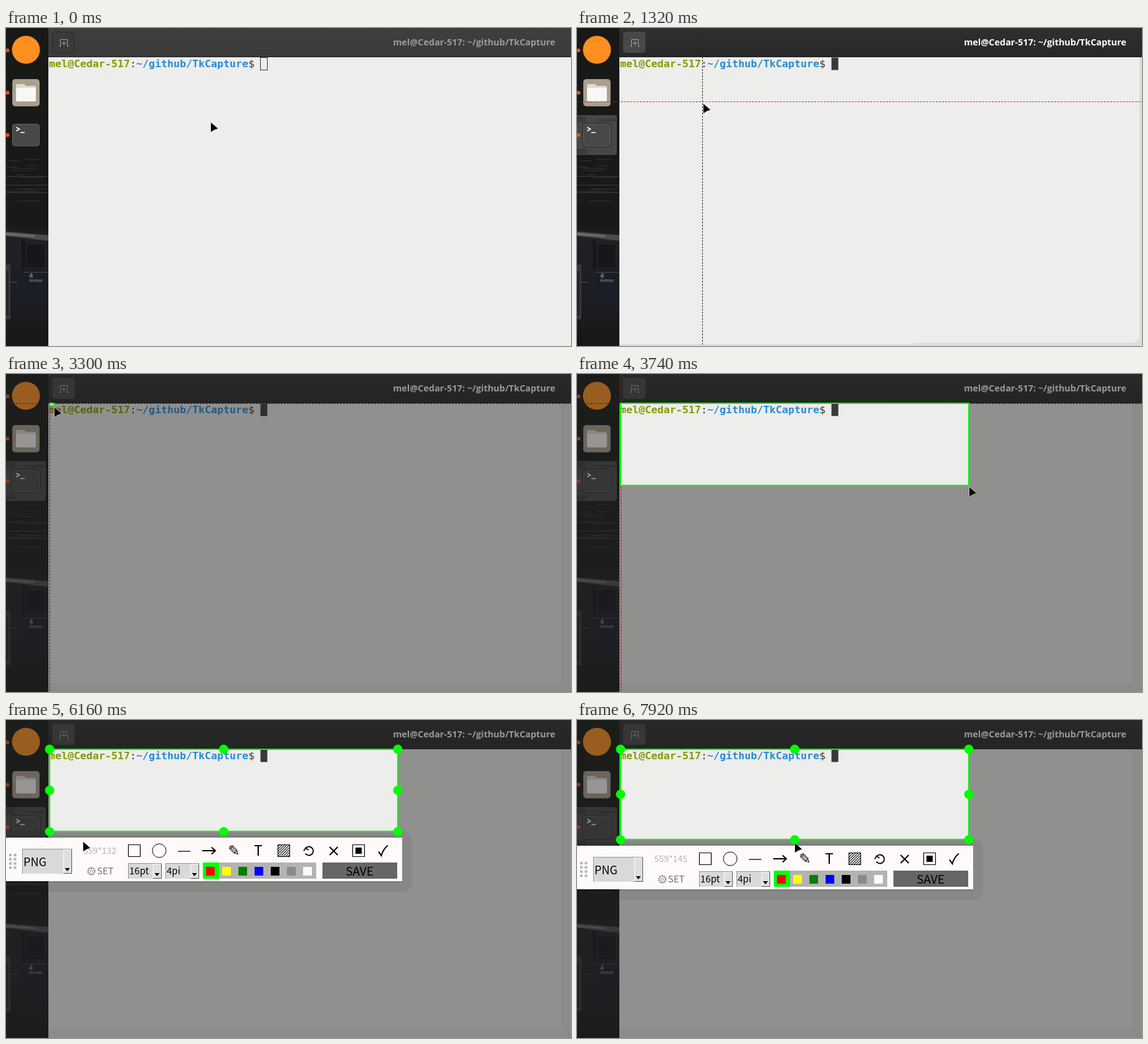
An HTML page for the animation above (8000 ms loop, 907 by 511 pixels).

```html
<!DOCTYPE html>
<html lang="en">
<head>
<meta charset="utf-8">
<title>Screen capture demo</title>
<style>
  html, body { margin: 0; width: 100%; height: 100%; overflow: hidden; background: #191a19; }
  svg { display: block; width: 907px; height: 511px; }
  text { white-space: pre; }
  .mono { font: 16.61px "DejaVu Sans Mono", monospace; fill: #333; }
  .mono .b { font-weight: 700; }
  .title { font: 700 14.4px "Open Sans", "Noto Sans", sans-serif; text-anchor: middle; fill: #9b9b99; }
  .ui { font-family: "Noto Sans CJK SC", "Noto Sans CJK JP", "Noto Sans CJK", "Noto Sans", sans-serif; }
  .line { fill: none; stroke: #000; }
  .active .title { fill: #fff; }
  .active .tab { fill: #484848; stroke: #484848; }
  .active .plus { stroke: #f2f2f2; }
  .active .bar { fill: url(#barOn); }
  .active .block { fill: #393939; stroke: none; }
  .on { display: none; }
  .active .on { display: inline; }
  .hot .combo:first-of-type .field { fill: #ececec; }
  [hidden] { display: none; }
</style>
</head>
<body>
<svg id="stage" viewBox="0 0 907 511" xmlns="http://www.w3.org/2000/svg">
  <defs>
    <linearGradient id="barOff" x2="0" y2="1"><stop stop-color="#3f3f3e"/><stop offset="1" stop-color="#3a3a3a"/></linearGradient>
    <linearGradient id="barOn" x2="0" y2="1"><stop stop-color="#303030"/><stop offset="1" stop-color="#272727"/></linearGradient>
    <linearGradient id="wall" x2="0" y2="1">
      <stop stop-color="#171917"/><stop offset=".62" stop-color="#181918"/>
      <stop offset=".66" stop-color="#202124"/><stop offset=".85" stop-color="#1c1e23"/><stop offset="1" stop-color="#161616"/>
    </linearGradient>
    <pattern id="hatch" width="4" height="4" patternUnits="userSpaceOnUse">
      <path d="M-1 1L1-1M-1 5L5-1M3 5L5 3" stroke="#000" stroke-width="1.1"/>
    </pattern>
  </defs>

  <!-- dock -->
  <rect width="68" height="511" fill="url(#wall)"/>
  <g id="streaks"></g>
  <path d="M0 327L68 333V342L0 334Z" fill="#4b4c50"/>
  <path d="M0 329L46 333V336L0 333Z" fill="#6a6b6d"/>
  <path d="M25 340H31V388H25ZM34 348H62V384H34Z" fill="#15171b"/>
  <path d="M32 388H66V440H32Z" fill="#1a1e26"/>
  <path d="M0 380H7V468H0Z" fill="#37383a"/>
  <path d="M0 390H4V462H0Z" fill="#232426"/>
  <path d="M29 392.500H68M6 408.500H19" stroke="#4a4b4d"/>
  <g class="ui" fill="#77787a" font-weight="700">
    <text x="37" y="402" font-size="11">4</text><text x="37" y="408" font-size="6">Avenue</text>
  </g>
  <path class="on" d="M0 140H60Q64 140 64 144V200Q64 204 60 204H0Z" fill="#474747"/>
  <path class="on" d="M0 142H14V152H0ZM30 146H62V150H36ZM0 194H16V202H0Z" fill="#3b3b3b"/>
  <circle cx="32" cy="35" r="22.500" fill="#ff8f1f"/>
  <rect x="10" y="82" width="44" height="44" rx="5" fill="#9c9481"/>
  <rect x="11" y="83" width="42" height="41" rx="4" fill="#a9a18e"/>
  <path d="M16 92Q16 90 18 90H29L32 93H46Q48 93 48 95V112H16Z" fill="#dedad2"/>
  <rect x="16" y="96" width="32" height="22" rx="2.500" fill="#f8f7f4"/>
  <rect class="on" x="8.500" y="152.500" width="47" height="39" rx="5" fill="#303030"/>
  <rect x="10.500" y="154.500" width="43" height="35" rx="4" fill="#484848" stroke="#626262"/>
  <path d="M16.500 159.500L21.500 162.500L16.500 165.500M23 168H30" class="line" style="stroke:#fff;stroke-width:1.7"/>
  <g fill="#e35220"><circle cx="2.500" cy="36" r="3"/><circle cx="2.500" cy="104" r="3"/><circle cx="2.500" cy="172" r="3"/></g>

  <!-- terminal -->
  <rect x="68" width="839" height="47" class="bar" fill="url(#barOff)"/>
  <rect x="68" y="46" width="839" height="1" fill="#222"/>
  <rect class="tab" x="74.500" y="6.500" width="35" height="33" rx="4" fill="#3a3a3a" stroke="#282828"/>
  <path class="plus line" d="M85 29.500H87.500V18.500H98.500V29.500H101M89.500 24.500H96.500M93 21V28" style="stroke:#a5a5a5"/>
  <text class="title" x="751.500" y="28">mel@Cedar-517: ~/github/TkCapture</text>
  <rect x="68" y="47" width="839" height="464" fill="#ededeb"/>
  <path id="edgeSoft" d="M903 47H907V511H68V508H535L545 506H890Q903 506 903 492Z" fill="#dcdcda"/>
  <path id="edgeDim" d="M891 47H907V511H68V497H891Z" fill="#e4e4e2"/>
  <text class="mono" x="69" y="63"><tspan class="b" fill="#859900">mel@Cedar-517</tspan>:<tspan class="b" fill="#268bd2">~/github/TkCapture</tspan>$</text>
  <rect class="block" x="408.500" y="47.500" width="11" height="20" fill="none" stroke="#333"/>

  <g id="cross" fill="none" stroke-dasharray="3 2"><path id="vLine"/><path id="hLine"/></g>
  <path id="dim" fill="#212121" fill-opacity=".46" fill-rule="evenodd"/>
  <g id="panel"></g>
  <rect id="sel" x="70" y="47" fill="none" stroke="#0f0" stroke-width="2"/>
  <g id="knobs" fill="#0f0"></g>
  <path id="mouse" d="M0 0V15L4.500 12L11 9.500Z" fill="#000" stroke="#d8d8d8" stroke-width="1.200" paint-order="stroke"/>
</svg>
<script>
const $ = id => document.getElementById(id);
const box = (x, y, w, h, fill, more = '') =>
  `<rect x="${x}" y="${y}" width="${w}" height="${h}" fill="${fill}" ${more}/>`;
const label = (x, y, size, fill, text, more = '') =>
  `<text class="ui" x="${x}" y="${y}" font-size="${size}" fill="${fill}" ${more}>${text}</text>`;
const stroke = (d, w = 1.2) => `<path class="line" d="${d}" stroke-width="${w}"/>`;

function combo(x, y, w, h, text, size, base) {
  const bx = x + w - 14, cx = bx + 6.5, by = y + h;
  return `<g class="combo">${box(x, y, w, h, '#d9d9d9', 'class="field"')}
    <path class="line" style="stroke:#929292" d="M${x + .5} ${by}V${y + .5}H${x + w}"/>
    ${box(bx, y + 1, 13, h - 2, '#dedede')}
    <path class="line" style="stroke:#fff" d="M${bx + .5} ${by - 1}V${y + 1.5}H${bx + 12}"/>
    <path class="line" style="stroke:#555" d="M${bx} ${by - .5}H${bx + 13.5}V${y + 1}"/>
    <path d="M${cx - 4} ${by - 9}h8l-4 5z"/>
    ${label(x + 2, base, size, '#000', text)}</g>`;
}

function toolbar() {
  const swatches = ['red', 'yellow', 'green', 'blue', 'black', '#8a8a8a', '#fffafa'];
  let s = box(-20, 177, 672, 100, '#000', 'rx="17" opacity=".055"') +
    box(-20, 185, 657, 77, '#000', 'rx="6" opacity=".06"') +
    box(0, 189, 636, 70, '#fffafa') +
    combo(26, 207, 80, 40, 'PNG', 18, 235);
  for (let i = 0; i < 8; i++) s += box(5 + i % 2 * 7.5, 215 + (i >> 1) * 6.8, 4, 4, '#b3b3b3');
  s += '<text id="size" class="ui" x="124" y="215" font-size="14" fill="#b4b4b4"></text>';
  s += `<g fill="none" stroke="#8b8b8b"><circle cx="137" cy="243" r="5.800" stroke-width="2" stroke-dasharray="2.2 1.4"/>
    <circle cx="137" cy="243" r="4.700"/><circle cx="137" cy="243" r="1.800"/></g>`;
  s += label(146, 248, 15, '#707070', 'SET');
  s += combo(196, 230, 54, 25, '16pt', 15, 248) + combo(256, 230, 54, 25, '4pi', 15, 248);
  s += box(316, 229, 182, 26, '#b3b3b3') + box(316, 229, 26, 26, '#0f0');
  swatches.forEach((c, i) => { s += box(321 + 26 * i, 236, 14, 14, c); });
  s += box(508, 229, 120, 26, '#666664') + label(567.5, 250, 19, '#000', 'SAVE', 'text-anchor="middle"');
  s += stroke('M196.5 200.500H215.500V219.500H196.500Z') + '<circle class="line" cx="246" cy="210" r="11"/>';
  s += stroke('M276 211H296', 1.3) + stroke('M315 210H336M330 204.500L336 210L330 215.500', 2);
  s += '<text x="366" y="218" font-size="23" text-anchor="middle" font-family="DejaVu Sans, sans-serif">✎</text>';
  s += label(405, 218, 23, '#000', 'T', 'text-anchor="middle" font-weight="500"');
  s += box(436.5, 200.5, 19, 19, 'url(#hatch)', 'stroke="#000"');
  s += stroke('M480.500 206.500A7 7 0 1 1 480.500 214.500M478 210.500L481 205.500L485.500 209', 1.8);
  s += stroke('M519.500 204L532.500 217M532.500 204L519.500 217', 2.1);
  s += stroke('M556.500 200.500H575.500V219.500H556.500Z') + box(561, 205, 10, 10, '#000');
  return s + stroke('M598 211.500L602.500 218Q605 208 613 201.500', 2.1);
}

function streaks() {
  let seed = 7, s = '';
  const rnd = () => (seed = seed * 16807 % 2147483647) / 2147483647;
  for (let i = 0; i < 16; i++) {
    const x = rnd() * 50 - 10, y = 200 + rnd() * 85;
    s += box(x, y, 8 + rnd() * 30, 1, '#343634');
  }
  for (const y of [238, 252, 264]) s += box(0, y, 68, 1, '#3a3b3a');
  return s;
}

$('panel').innerHTML = toolbar();
$('streaks').innerHTML = streaks();

// Pointer tip at each 220 ms tick.
const path = [
  [329, 152], [329, 152], [300, 148], [268, 140], [240, 132], [216, 126], [203, 122],
  [188, 112], [160, 95], [130, 79], [104, 67], [89, 60],
  [79, 55], [74, 52], [72, 51], [78, 54], [400, 122], [630, 182], [630, 182],
  [626, 187], [560, 186], [470, 183], [415, 180], [415, 180],
  [500, 130], [650, 75], [781, 28], [62, 226], [124, 196],
  [98, 186], [69, 174], [150, 177], [255, 180], [343, 178], [352, 181], [352, 181], [350, 198]
];
const show = (id, on) => $(id).toggleAttribute('hidden', !on);

function draw(tick) {
  const [mx, my] = path[tick];
  const picked = tick >= 15, done = tick >= 19;
  const right = tick < 17 ? mx - 1 : 629;
  const bottom = tick < 17 ? my - 3 : tick < 36 ? 179 : 192;

  $('stage').classList.toggle('active', tick >= 2);
  $('stage').classList.toggle('hot', tick === 27);
  $('mouse').setAttribute('transform', `translate(${mx} ${my})`);

  show('edgeSoft', tick >= 2 && !picked);
  show('edgeDim', picked);
  show('cross', tick >= 2 && !done);
  const cx = picked ? 70 : mx - 2, cy = picked ? 47 : my - 4, late = tick >= 10;
  $('vLine').setAttribute('d', `M${cx + .5} 1V511`);
  $('hLine').setAttribute('d', `M1 ${cy + .5}H907`);
  $('vLine').setAttribute('stroke', late ? '#f00' : '#222');
  $('hLine').setAttribute('stroke', late ? '#333' : '#f00');

  show('dim', picked);
  show('sel', picked);
  show('knobs', done);
  show('panel', tick >= 20);
  if (!picked) return;
  $('dim').setAttribute('d', `M0 0H907V511H0ZM70 47H${right}V${bottom}H70Z`);
  $('sel').setAttribute('width', right - 70);
  $('sel').setAttribute('height', bottom - 47);
  $('panel').setAttribute('transform', `translate(0 ${bottom - 179})`);
  $('size').textContent = `${right - 70}*${bottom - 47}`;
  let dots = '';
  for (const x of [70, 349.5, 629])
    for (const y of [47, (47 + bottom) / 2, bottom + .5])
      if (x !== 349.5 || y === 47 || y > bottom) dots += `<circle cx="${x}" cy="${y}" r="7.500"/>`;
  $('knobs').innerHTML = dots;
}

let last = -1;
function frame() {
  const tick = Math.floor(performance.now() % 8000 / 220);
  if (tick !== last) draw(last = tick);
  requestAnimationFrame(frame);
}
frame();
</script>
</body>
</html>
```
